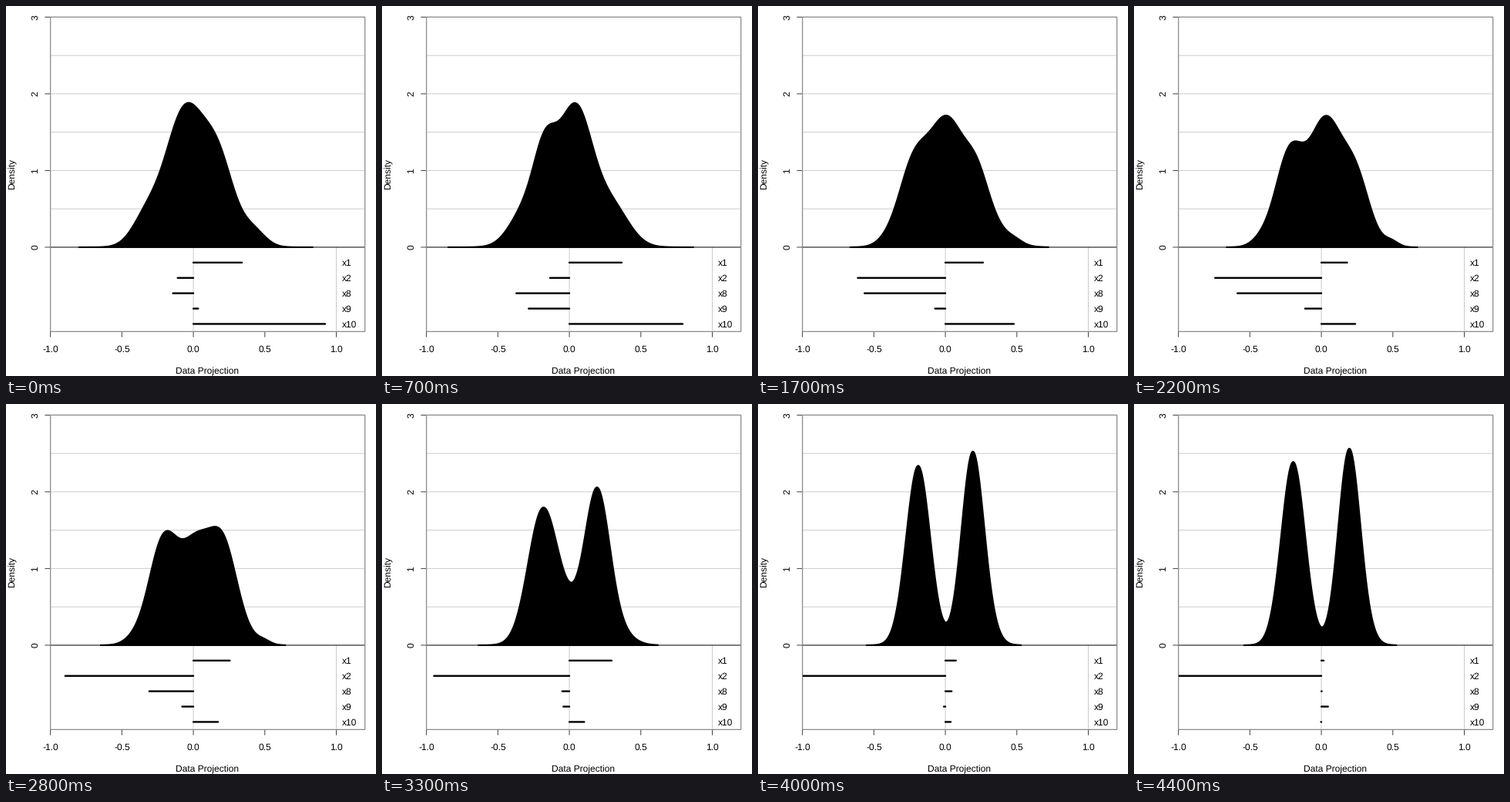
These frames come from a looping animation (480x480 px, 4500 ms). A matplotlib script:

```python
import numpy as np
import matplotlib.pyplot as plt
from matplotlib.animation import FuncAnimation
from matplotlib.patches import Rectangle

plt.rcParams.update({
    "toolbar": "None",
    "font.family": "Liberation Sans",
    "font.size": 12,
    "text.hinting": "none",
    "path.snap": False,
})

SIZE, DPI = 480, 72
FRAMES, INTERVAL = 45, 100
LEFT, RIGHT, TOP, BOTTOM = 57.6, 465.6, 14.4, 422.4
TICK = 7.2
LABELS = ["x1", "x2", "x8", "x9", "x10"]
AXIS, GRID, BOX = "#404040", "#cccccc", "#999999"


def px(x):
    return LEFT + (x + 1) * (RIGHT - LEFT) / 2.2


def py(y):
    return BOTTOM - (y + 1.1) * (BOTTOM - TOP) / 4.1


BASE = py(0)


class Pose:
    """One projection: unit weights, support and a density made of
    Gaussian bumps (height, centre, spread)."""

    def __init__(self, step, weights, support, *bumps, ease=1.0):
        self.step, self.ease = step, ease
        self.weights = np.array(weights)
        self.support = np.array(support)
        self.bumps = bumps

    def density(self, x):
        return sum(h * np.exp(-0.5 * ((x - c) / s) ** 2)
                   for h, c, s in self.bumps)


POSES = [
    Pose(0, [.34, -.11, -.143, .034, .922], [-.80, .835],
         (1.76, -.06, .135), (1.0, .18, .11), (.35, -.33, .1),
         (.2, .42, .085)),
    Pose(7, [.365, -.135, -.37, -.284, .79], [-.848, .867],
         (1.8, .04, .12), (.92, -.17, .08), (.48, -.305, .11),
         (.5, .3, .12)),
    Pose(13, [.313, -.47, -.513, -.034, .642], [-.668, .763],
         (1.68, -.01, .14), (.68, -.245, .11), (.63, .215, .08),
         (.25, .38, .11)),
    Pose(22, [.18, -.742, -.586, -.114, .237], [-.663, .671],
         (1.55, .025, .108), (1.22, -.22, .1), (.92, .235, .1),
         (.08, -.42, .07), (.07, .49, .05)),
    Pose(33, [.295, -.945, -.05, -.042, .104], [-.637, .62],
         (1.73, -.188, .102), (1.93, .194, .086), (.36, 0, .1),
         (.18, .33, .1), ease=2.2),
    Pose(40, [.074, -.995, .044, -.011, .038], [-.552, .53],
         (2.34, -.19, .084), (2.41, .189, .077), (.2, .275, .08), ease=1.4),
    Pose(44, [.016, -.998, .003, .047, -.003], [-.541, .525],
         (2.39, -.197, .083), (2.48, .193, .0755), (.16, .28, .075)),
]


def state(step):
    """Weights and density outline, blended between neighbouring poses."""
    a, b = next((p, q) for p, q in zip(POSES, POSES[1:]) if step <= q.step)
    u = (step - a.step) / (b.step - a.step)
    v = u ** b.ease
    w = (1 - u) * a.weights + u * b.weights
    x = np.linspace(*((1 - u) * a.support + u * b.support), 500)
    y = (1 - v) * a.density(x) + v * b.density(x)
    return w / np.linalg.norm(w), x, y


fig = plt.figure(figsize=(SIZE / DPI, SIZE / DPI), dpi=DPI, facecolor="white")
ax = fig.add_axes([0, 0, 1, 1])
ax.set(xlim=(0, SIZE), ylim=(SIZE, 0))
ax.axis("off")
clip = Rectangle((LEFT, TOP), RIGHT - LEFT, BOTTOM - TOP,
                 transform=ax.transData)


def line(xs, ys, color="black", lw=1, z=1, cap="butt"):
    return ax.plot(xs, ys, color=color, lw=lw, zorder=z, snap=False,
                   solid_capstyle=cap)[0]


def text(x, y, s, ha="center", rot=0):
    ax.text(x, y, s, ha=ha, va="baseline", rotation=rot,
            rotation_mode="anchor", color="black", zorder=7)


# Axes, grid and frame
for v in np.arange(-1, 1.1, 0.5):
    line([px(v)] * 2, [BOTTOM, BOTTOM + TICK], AXIS)
    text(px(v), 449, f"{v:.1f}")
for v in range(4):
    line([LEFT - TICK, LEFT], [py(v)] * 2, AXIS)
    text(41, py(v), str(v), rot=90)
for v in np.arange(0.5, 3, 0.5):
    line([LEFT, RIGHT], [py(v)] * 2, GRID, z=2)
for v in (0, 1):
    line([px(v)] * 2, [BASE, BOTTOM], GRID, z=2)
line([LEFT, RIGHT], [BASE, BASE], z=4)
for color, z in (("black", 1), (BOX, 5)):
    ax.add_patch(Rectangle((LEFT, TOP), RIGHT - LEFT, BOTTOM - TOP, fill=False,
                           ec=color, lw=1, zorder=z, snap=False))
text((LEFT + RIGHT) / 2 - 0.6, 478, "Data Projection")
text(12, (TOP + BOTTOM) / 2 - 0.6, "Density", rot=90)

# Moving parts
shape = ax.fill([0, 1, 1], [0, 0, 1], fc="black", ec="black", lw=2,
                joinstyle="round", zorder=3)[0]
bars = []
for k, name in enumerate(LABELS):
    y = py(-0.2 * (k + 1))
    bar = line([px(0)] * 2, [y, y], lw=2.4, z=6, cap="round")
    bar.set_clip_path(clip)
    bars.append(bar)
    text(435.6, y + 4, name, ha="left")


def update(step):
    weights, x, y = state(step)
    shape.set_xy(np.vstack([
        [[px(x[0]), BASE]],
        np.column_stack([px(x), py(y)]),
        [[px(x[-1]), BASE]],
    ]))
    for bar, w in zip(bars, weights):
        bar.set_xdata([px(0), px(w)])
    return [shape, *bars]


anim = FuncAnimation(fig, update, frames=FRAMES, interval=INTERVAL,
                     init_func=lambda: update(0), repeat=True, repeat_delay=0,
                     blit=False)
plt.show()
```
